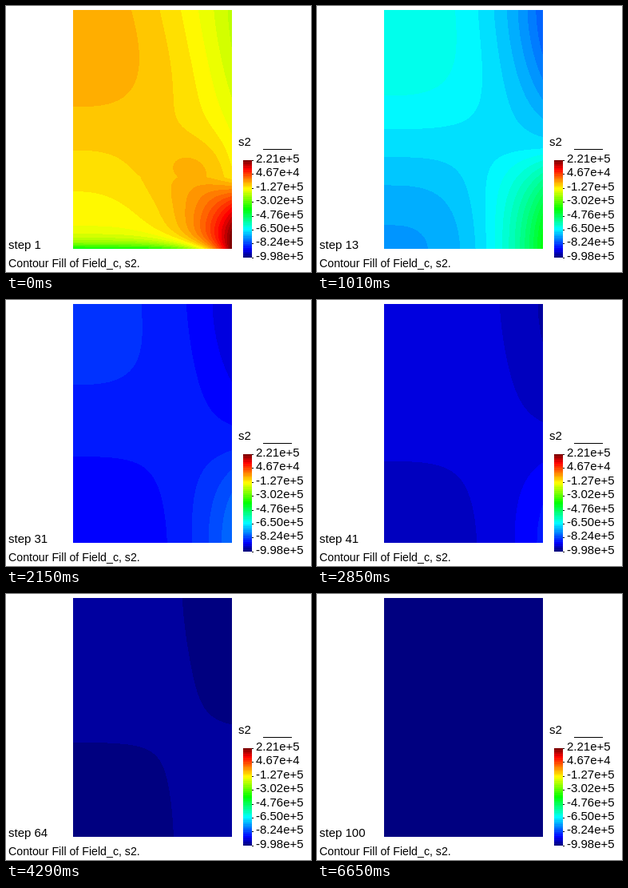
These frames come from a looping animation (382x333 px, 7.05 s). An HTML page with a canvas:

```html
<!DOCTYPE html>
<html lang="en">
<head>
<meta charset="utf-8">
<title>Contour fill</title>
<style>
html, body { margin: 0; width: 100%; height: 100%; overflow: hidden; background: #fff; }
canvas, svg { position: absolute; left: 0; top: 0; display: block; }
text { font: 15px "Liberation Sans", Arial, sans-serif; fill: #000; white-space: pre; }
.caption { font-size: 14.2px; }
</style>
</head>
<body>
<canvas id="stage" width="382" height="333"></canvas>
<svg id="labels" width="382" height="333">
  <text x="291" y="175">s2</text>
  <text id="step" x="3" y="304">step 1</text>
  <text class="caption" x="3" y="327">Contour Fill of Field_c, s2.</text>
</svg>
<script>
const ctx = document.getElementById('stage').getContext('2d');
const svg = document.getElementById('labels');
const stepText = document.getElementById('step');

const LOOP = 7050, HOLD = 330, FRAME = 67.1, LAST = 100;
const BANDS = 50, EDGE = 4;
const X = 84, Y = 5, W = 199, H = 299;
const { PI, sin, cos, exp, pow, floor, round, min, max } = Math;

const clamp = (v, lo, hi) => min(hi, max(lo, v));

// blue, cyan, green, yellow, red, with darkened bands at both ends
function bandColor(i) {
  const top = BANDS - 1;
  const k = (i - EDGE) / (top - 2 * EDGE) * 4;
  const end = n => 0.5 + n / (2 * EDGE);
  return [
    min(k - 2, end(top - i)),
    min(k, 4 - k),
    min(2 - k, end(i))
  ].map(v => round(255 * clamp(v, 0, 1)));
}
const palette = Array.from({ length: BANDS }, (_, i) => bandColor(i));

// the steps run slightly faster than the frames, so one is skipped now and then
function stepAt(t) {
  if (t < HOLD) return 1;
  return min(LAST, floor(3.4 + 1.028 * floor((t - HOLD) / FRAME)));
}

const image = ctx.createImageData(W, H);

// a slowly decaying saddle plus a short initial transient
function drawField(step) {
  const slow = exp(-0.0495 * step);
  const early = exp(-(step - 1) / 3.8);
  const mean = 24.3 * slow + 13.95 * early;
  const swing = 5.1 * slow - 3.1 * early;
  const drop = 15.5 * slow - 8.6 * early;
  const rise = 20.5 * slow + 20 * exp(-step / 8) - 22 * early;
  const saddle = 0.56 + 0.14 * early;
  const skin = 11 * exp(-(step - 1) / 1.5);

  const px = image.data;
  let n = 0;
  for (let y = 0; y < H; y++) {
    const w = (y + 0.5) / H;
    const left = mean + swing * cos(PI * pow(w, 1.25));
    const span = w < saddle
      ? -drop * cos(PI / 2 * w / saddle)
      : rise * sin(PI / 2 * (w - saddle) / (1 - saddle));
    const power = 2.7 - 0.7 * early + (0.6 + 1.4 * early) * w;
    const hump = 1.9 * early * exp(-pow((w - 0.68) / 0.15, 2));
    const chill = skin * exp((w - 1) / 0.03);
    for (let x = 0; x < W; x++) {
      const u = (x + 0.5) / W;
      const v = left + span * pow(u, power)
        + hump * sin(PI * pow(u, 2.5)) - chill * (1 - u ** 5);
      const [r, g, b] = palette[clamp(floor(v), 0, BANDS - 1)];
      px[n++] = r;
      px[n++] = g;
      px[n++] = b;
      px[n++] = 255;
    }
  }
  ctx.putImageData(image, X, Y);
}

function addLabel(label, x, y) {
  const text = document.createElementNS(svg.namespaceURI, 'text');
  text.setAttribute('x', x);
  text.setAttribute('y', y);
  text.textContent = label;
  svg.appendChild(text);
}

function drawLegend() {
  const top = 193, height = 122, high = 2.21e5, low = -9.98e5, gaps = 7;
  for (let y = 0; y < height; y++) {
    const i = floor((1 - (y + 0.5) / height) * BANDS);
    ctx.fillStyle = `rgb(${palette[i]})`;
    ctx.fillRect(297, top + y, 11, 1);
  }
  ctx.fillStyle = '#000';
  ctx.fillRect(322, 179, 36, 1);
  for (let i = 0; i <= gaps; i++) {
    const y = round(i * 17.4);
    const value = high + (low - high) * i / gaps;
    ctx.fillRect(308, top + y, 2, 1);
    // the small offset settles how the mid values round
    addLabel((value - 260 * sin(PI * i / gaps)).toExponential(2), 313, 196 + y);
  }
}

let shown = 0;
function show(t) {
  const step = stepAt(t);
  if (step === shown) return;
  shown = step;
  drawField(step);
  stepText.textContent = 'step ' + step;
}

ctx.fillStyle = '#fff';
ctx.fillRect(0, 0, 382, 333);
drawLegend();
show(0);

const start = performance.now();
function tick() {
  show((performance.now() - start) % LOOP);
  requestAnimationFrame(tick);
}
requestAnimationFrame(tick);
</script>
</body>
</html>
```
